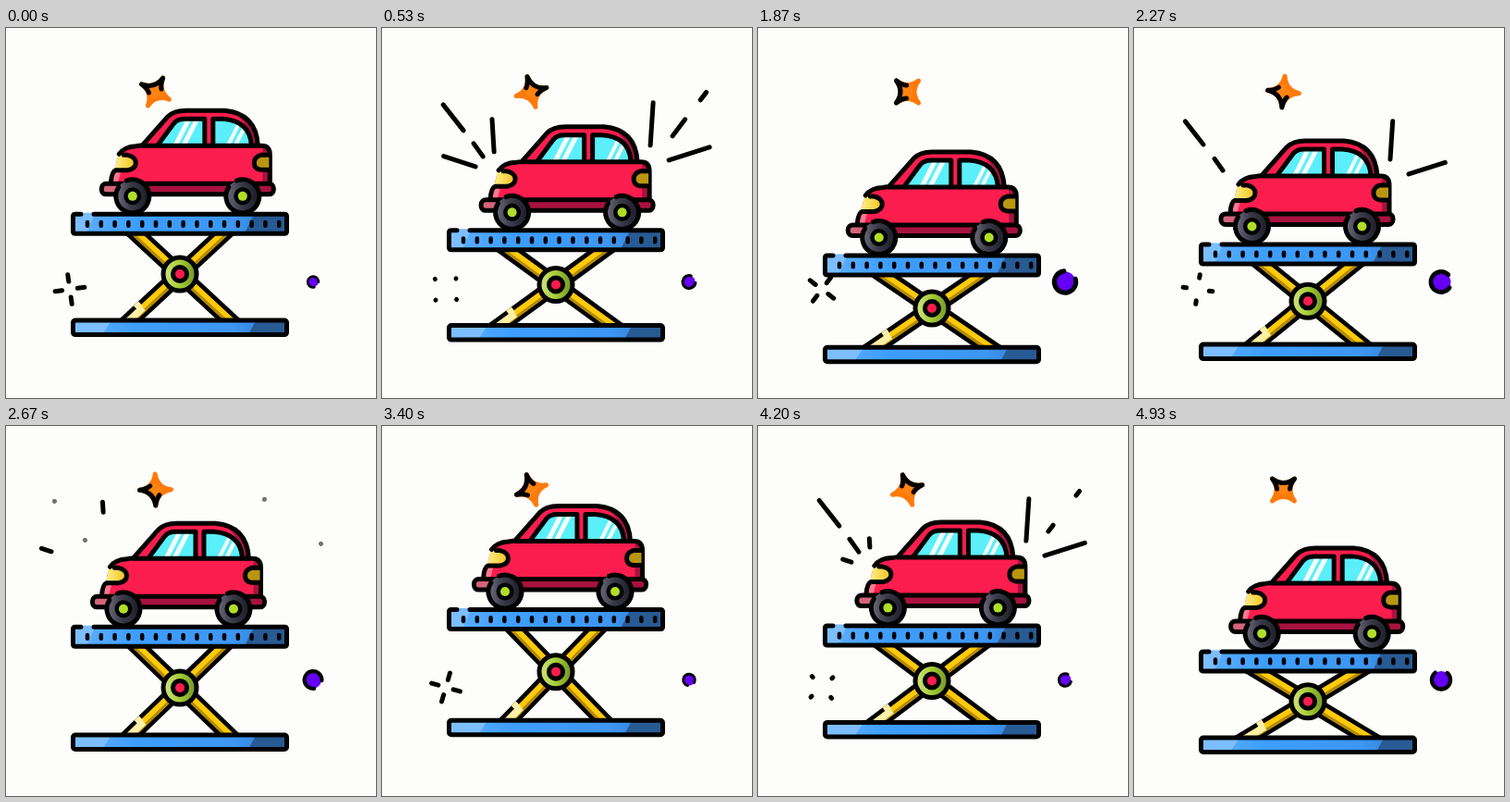
An HTML page that plays this animation: 400 by 400 pixels, repeating every 4.99 s.

```html
<!DOCTYPE html>
<html lang="en">
<head>
<meta charset="utf-8">
<title>Car lift</title>
<style>
  html, body { margin: 0; width: 100%; height: 100%; overflow: hidden; background: #fdfdfc; }
  svg { display: block; width: 100vw; height: 100vh; }
  .ink { stroke: #000; stroke-width: 5; stroke-linecap: round; stroke-linejoin: round; }
  .line { fill: none; }
</style>
</head>
<body>
<svg viewBox="0 0 400 400">
  <defs>
    <linearGradient id="tire"><stop stop-color="#6c6c7c"/><stop offset=".45" stop-color="#3a3a48"/><stop offset="1" stop-color="#1c1c28"/></linearGradient>
    <linearGradient id="lime"><stop stop-color="#d3e582"/><stop offset=".5" stop-color="#a4cc35"/><stop offset="1" stop-color="#6f9222"/></linearGradient>
    <linearGradient id="lamp"><stop stop-color="#fff08c"/><stop offset="1" stop-color="#f2c21c"/></linearGradient>
    <linearGradient id="steel"><stop stop-color="#62b0ff"/><stop offset=".3" stop-color="#3d9eff"/><stop offset=".75" stop-color="#3d96f2"/><stop offset="1" stop-color="#2f78c8"/></linearGradient>
    <clipPath id="bodyClip"><path d="M113 168 Q114 156 118 152 Q119 131 138 128 L147 126 L174 96 Q181 89 194 89 H236 Q270 92 272 127 Q285 127 285 137 V168Z"/></clipPath>
    <clipPath id="leftPane"><path d="M164 126 L181 103 Q185 98 193 98 H214.500 V126Z"/></clipPath>
    <clipPath id="rightPane"><path d="M223.500 98 H234 Q263 100 265 126 H223.500Z"/></clipPath>
    <g id="wheel">
      <circle r="18" fill="url(#tire)"/>
      <circle class="ink line" r="18" stroke-dasharray="101 12.1" transform="rotate(-111)"/>
      <circle r="9.5"/>
      <circle r="5" fill="#b0dd28"/>
    </g>
  </defs>

  <g id="spark"></g>

  <g id="star" stroke-linejoin="round" stroke-linecap="round" stroke-width="5">
    <path fill="#ff8412" stroke="#ff7a0a" d="M-12 -12 Q0 -3 12 -12 Q3 0 12 12 Q0 3 -12 12 Q-3 0 -12 -12Z"/>
    <path fill="none" stroke="#000" d="M-7 -1 Q-7.500 -6 -12 -12 Q0 -3 12 -12 Q7.500 -6 7 -1"/>
  </g>

  <g id="ball">
    <circle r="11" fill="#6500f5"/>
    <circle class="line" r="11.5" stroke="#000" stroke-width="5" stroke-linecap="round" stroke-dasharray="56 16.3" transform="rotate(-50)"/>
  </g>

  <g id="beams"></g>

  <g id="hub">
    <circle class="ink" r="18" fill="url(#lime)"/>
    <circle r="10"/>
    <circle r="5" fill="#ff1c4e"/>
  </g>

  <g id="base">
    <rect x="72.5" y="2.5" width="231" height="15.5" fill="url(#steel)"/>
    <path fill="#7cbeff" d="M72.5 3 H114 L104 18 H72.5Z"/>
    <path fill="#285a94" d="M270 3 H303 V18 H262Z"/>
    <rect class="ink line" x="72.5" y="2.5" width="231" height="15.5" rx="2.5"/>
  </g>

  <g id="platform">
    <rect x="72.5" y="1.5" width="231" height="22" fill="url(#steel)"/>
    <path fill="#7cbeff" d="M73 1 H97 L87 23 H73Z"/>
    <path fill="#285a94" d="M268 3 H303 V23 H258Z"/>
    <path class="ink line" d="M81 2.5 H75 Q72.5 2.5 72.5 5 V21 Q72.5 23.5 75 23.5 H301 Q303.5 23.5 303.5 21 V5 Q303.5 2.5 301 2.5 H95"/>
    <path class="line" stroke="#000" stroke-width="4.5" stroke-linecap="round" id="slots"/>
  </g>

  <g id="car">
    <g id="rays" class="ink"></g>
    <g clip-path="url(#bodyClip)">
      <rect x="100" y="80" width="200" height="100" fill="#fb1d4d"/>
      <path fill="#a81240" d="M236 89 Q262 94 265 127 H277 V170 H290 V85Z"/>
      <path fill="#ff7890" d="M110 154 H124 L120 170 H110Z"/>
    </g>
    <g clip-path="url(#leftPane)">
      <rect x="160" y="90" width="60" height="40" fill="#5aeffa"/>
      <path stroke="#f4ffff" d="M181 130 L199 95 M190 130 L208 95" stroke-width="5"/>
    </g>
    <g clip-path="url(#rightPane)">
      <rect x="220" y="90" width="50" height="40" fill="#5aeffa"/>
      <path stroke="#f4ffff" d="M238 130 L254 98 M246 130 L262 98" stroke-width="4"/>
    </g>
    <path class="ink line" d="M164 126 L181 103 Q185 98 193 98 H214.500 V126 M223.500 126 V98 H234 Q263 100 265 126"/>
    <path fill="url(#lamp)" d="M121 137 H131 Q140 139 140 145.500 Q140 152 131 153.500 H117Z"/>
    <path class="ink line" d="M122 136 Q128 128 140 127.500 L147 126.500 L174 96 Q181 89 194 89 H236 Q270 92 272 127 M147 127 H276 Q285 127 285 137 V168"/>
    <path class="ink line" d="M113 167 Q114 155 118 153.500 H131 Q140 152 140 145.500 Q140 139 131 137 H127"/>
    <path class="ink" fill="#b8960f" d="M284 137 H275 Q268 139 268 145.500 Q268 152 275 153 H284"/>
    <rect x="103" y="168" width="186" height="11" rx="5" fill="#a81240"/>
    <path fill="#d4647a" d="M108 168 H121 V179 H108 Q103 178 103 173.500 Q103 169 108 168Z"/>
    <rect class="ink line" x="103" y="168" width="186" height="11.500" rx="5"/>
    <use href="#wheel" x="136.500" y="181.500"/>
    <use href="#wheel" x="255.500" y="181.500"/>
  </g>
</svg>
<script>
const LOOP = 4990, STEP = 200 / 3, CYCLE = 11200 / 3, LEAD = 265;
const $ = id => document.getElementById(id);
const add = (parent, tag, attrs) => {
  const node = document.createElementNS('http://www.w3.org/2000/svg', tag);
  set(node, attrs);
  parent.appendChild(node);
  return node;
};
function set(node, attrs) {
  for (const key in attrs) node.setAttribute(key, attrs[key]);
}
const move = (id, x, y, rest = '') => set($(id), { transform: `translate(${x} ${y}) ${rest}` });
const clamp = v => Math.min(1, Math.max(0, v));
const easeOut = v => 1 - (1 - clamp(v)) ** 3;
const mix = (a, b, k) => a + (b - a) * k;

let slots = '';
for (let i = 0; i < 15; i++) slots += `M${88 + i * 14.8} 11.2v3.6`;
set($('slots'), { d: slots });

// Each beam is a stack of parallel strokes around the hub.
const layers = [['#000', 18, 0], ['#ffca0a', 8.6, 0], ['#b48a00', 3, 2.8]];
const beams = [1, -1].map(side => {
  const group = add($('beams'), 'g', {});
  const lines = layers.map(([stroke, width, y]) =>
    add(group, 'line', { stroke, 'stroke-width': width, y1: y, y2: y }));
  return { side, group, lines };
});
const shine = add(beams[1].group, 'line', { x1: -54, y1: -.5, y2: -.5, stroke: '#fff0a8', 'stroke-width': 7.6 });
add(beams[1].group, 'line', { x1: -60, x2: -53, y1: -5.5, y2: -5.5, stroke: '#fff0a8', 'stroke-width': 7 });

// Ray: inner end, outer end, start, duration
const rays = [
  [84, 93, 62, 65, 250, 570], [105, 121, 95, 107, 250, 570],
  [117, 116, 114, 66, 450, 500], [97, 132, 48, 116, 450, 500],
  [286, 109, 289, 63, 250, 570], [306, 125, 350, 111, 250, 570],
  [310, 99, 325, 79, 445, 330], [340, 60, 347, 51, 430, 340]
].map(spec => ({ spec, node: add($('rays'), 'line', {}) }));

const ticks = [0, 90, 180, 270].map(angle =>
  add($('spark'), 'line', { class: 'ink', transform: `rotate(${angle})` }));

function drawRay({ spec: [x1, y1, x2, y2, start, span], node }, time) {
  const u = (time - start) / span;
  const head = easeOut(u * 2), tail = easeOut(u * 2 - 1);
  const length = Math.hypot(x2 - x1, y2 - y1) * (head - tail);
  set(node, {
    x1: mix(x1, x2, tail), y1: mix(y1, y2, tail),
    x2: mix(x1, x2, head), y2: mix(y1, y2, head),
    opacity: u <= 0 || u >= 1 ? 0 : length < 3 ? .55 : 1
  });
}

function draw(t) {
  const w = 2 * Math.PI / CYCLE;
  const wave = Math.cos(w * t);
  const sway = Math.sin(w * (t + LEAD));
  const burst = t % (CYCLE / 2);

  const baseY = 328.2 - 14.6 * wave;
  const topY = 221.2 - 25.2 * Math.cos(w * (t + 285));
  const hubY = (baseY + topY) / 2 + 9.8;
  move('base', 0, baseY);
  move('platform', 0, topY);
  move('hub', 188, hubY);
  move('car', 7 * sway - 2.7, topY - 198.5);

  const tilt = Math.asin(((baseY - topY - 3) / 2 - 11) / 66);
  const up = (hubY - topY - 14) / Math.sin(tilt);
  const down = (baseY + 10 - hubY) / Math.sin(tilt);
  for (const { side, group, lines } of beams) {
    set(group, { transform: `translate(188 ${hubY}) rotate(${side * tilt * 180 / Math.PI})` });
    for (const line of lines) set(line, { x1: side > 0 ? -up : -down, x2: side > 0 ? down : up });
  }
  set(shine, { x2: -down });

  move('star', 161.5, 69, `rotate(${-53 + 85 * sway})`);
  const gap = 80 - 80 * Math.cos(w * (t - 1300));
  move('ball', 332, 274.5, `rotate(${gap}) scale(${(10.7 - 3.5 * wave) / 14})`);

  for (const ray of rays) drawRay(ray, burst);

  const sinceShow = (burst - 1230 + CYCLE / 2) % (CYCLE / 2);
  const head = easeOut(sinceShow / 300);
  const tail = clamp((sinceShow - 760) / 380) ** 2;
  move('spark', 69, 282.5, `rotate(${-8 - 270 * t / CYCLE})`);
  for (const tick of ticks) set(tick, {
    x1: mix(8.5, 16, tail), x2: mix(8.5, 16, head),
    opacity: sinceShow < 1180 ? 1 : 0
  });
}

let begin;
function frame(now) {
  begin ??= now;
  const t = (now - begin) % LOOP;
  draw(Math.floor((t + 4) / STEP) * STEP);
  requestAnimationFrame(frame);
}
draw(0);
requestAnimationFrame(frame);
</script>
</body>
</html>
```
